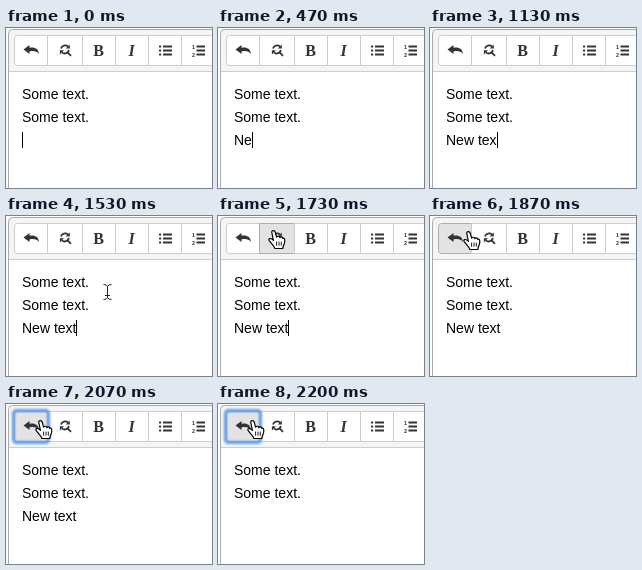
An HTML page that plays this animation: 206 by 160 pixels, repeating every 2.47 s.

```html
<!DOCTYPE html>
<html lang="en">
<head>
<meta charset="utf-8">
<title>Undo in a text editor</title>
<style>
html, body { margin: 0; width: 100%; height: 100%; overflow: hidden; background: #fff; }
svg { display: block; width: 100vw; height: 100vh; }
.line { font: 14px "Liberation Sans", Arial, sans-serif; fill: #000; white-space: pre; }
.glyph { font: bold 16px "Liberation Serif", Times, serif; fill: #333; text-anchor: middle; }
.num { font: bold 5.5px "Liberation Sans", Arial, sans-serif; fill: #333; }
.button { fill: #fff; stroke: #ccc; }
.hover { fill: #e3e3e3; stroke: #adadad; }
</style>
</head>
<body>
<svg viewBox="0 0 206 160" xmlns="http://www.w3.org/2000/svg">
  <defs>
    <filter id="soft" x="-30%" y="-30%" width="160%" height="160%"><feGaussianBlur stdDeviation="0.8"/></filter>
  </defs>
  <rect width="206" height="160" fill="#fff"/>
  <path d="M2.5 43.5V5.5Q2.5 1.5 6.5 1.5H206V43.5Z" fill="#f5f5f5"/>
  <path d="M3 43.5H206" stroke="#ccc"/>
  <path d="M2.5 160V5.5Q2.5 1.5 6.5 1.5H206" fill="none" stroke="#aaa"/>

  <g id="buttons"></g>
  <rect id="ring" x="7.5" y="6.5" width="35" height="32" rx="3" fill="none" stroke="#5a9bea" stroke-width="3" filter="url(#soft)"/>

  <path d="M17.5 21.5L23.5 17V19.7C29 18.8 32.5 20.8 33 26C30.6 23.1 28 22.6 23.5 23.4V26Z" fill="#333"/>
  <g fill="none" stroke="#333" stroke-width="1.8">
    <path d="M55 20.5A4.2 4.2 0 0 1 62 18.6M62.9 22A4.2 4.2 0 0 1 56 24.4M61.6 24.4L65 27.8"/>
    <path d="M63.8 16.4V20.6H59.8ZM53.9 26.5V22.3H58Z" fill="#333" stroke="none"/>
  </g>
  <text class="glyph" x="92.5" y="28">B</text>
  <text class="glyph" x="125.5" y="28" font-style="italic" style="font-style:italic">I</text>
  <g id="lists" fill="#333"></g>

  <text class="line" x="16" y="71">Some text.</text>
  <text class="line" x="16" y="94">Some text.</text>
  <text class="line" id="typed" x="16" y="117" xml:space="preserve"></text>
  <rect id="caret" y="104" width="1" height="16" fill="#000"/>

  <g id="beam" fill="none" stroke-linecap="square">
    <path d="M-3 -7.5Q0 -7.5 0.5 -5.5Q1 -7.5 4 -7.5M0.5 -5.5V5.5M-3 7.5Q0 7.5 0.5 5.5Q1 7.5 4 7.5M-1.5 3.5H2.5" stroke="#fff" stroke-width="2.6"/>
    <path d="M-3 -7.5Q0 -7.5 0.5 -5.5Q1 -7.5 4 -7.5M0.5 -5.5V5.5M-3 7.5Q0 7.5 0.5 5.5Q1 7.5 4 7.5M-1.5 3.5H2.5" stroke="#222"/>
  </g>
  <g id="hand" stroke="#000" stroke-linejoin="round" stroke-linecap="round">
    <path d="M-2.2 1.5C-2.6 -0.8 0.6 -1 1.2 1L2.6 6.2C3.2 4.8 5.6 5 5.9 6.6C6.7 5.4 8.6 5.8 8.8 7.4C10 6.8 11 7.8 10.8 10C10.7 13 9.2 14.2 8.8 17.5H1C0 14.4 -3.4 12 -5 9.2C-5.6 7.4 -3.4 6.9 -1.8 8.4L-0.6 9.4Z" fill="#fff" stroke-width="1.2"/>
    <path d="M2.6 11V14.3M5 11V14.3M7.3 11V14.3" stroke-width="0.9"/>
  </g>
</svg>
<script>
const LOOP = 2470;
const NS = "http://www.w3.org/2000/svg";
const get = id => document.getElementById(id);

function add(parent, tag, attrs, text = "") {
  const el = document.createElementNS(NS, tag);
  for (const key in attrs) el.setAttribute(key, attrs[key]);
  el.textContent = text;
  parent.appendChild(el);
  return el;
}

const edges = [8.5, 41.5, 76.5, 109.5, 142.5, 175.5, 209.5];
const buttons = edges.slice(0, -1).map((x, i) => {
  const right = edges[i + 1];
  const d = i === 0
    ? `M${right} 7.5H11.5Q${x} 7.5 ${x} 10.5V34.5Q${x} 37.5 11.5 37.5H${right}Z`
    : `M${x} 7.5H${right}V37.5H${x}Z`;
  return add(get("buttons"), "path", { d, class: "button" });
});

for (let row = 0; row < 3; row++) {
  const y = 17.5 + row * 4;
  add(get("lists"), "rect", { x: 153, y, width: 2.2, height: 2, rx: 0.6 });
  add(get("lists"), "rect", { x: 157, y, width: 9, height: 2 });
  add(get("lists"), "rect", { x: 190.5, y, width: 8.5, height: 2 });
  if (row !== 1) add(get("lists"), "text", { x: 186, y: y + 3, class: "num" }, row ? "2" : "1");
}

// [time, value] steps; the last one reached holds
const typing = [[0, ""], [270, "N"], [470, "Ne"], [530, "New"], [670, "New "], [870, "New t"],
  [930, "New te"], [1130, "New tex"], [1330, "New text"], [2200, ""]];
const pointer = [[0, null], [1530, [101, 76]], [1600, [88, 56]], [1670, [67, 28]], [1730, [56, 15]],
  [1800, [51, 15]], [1870, [39, 16]], [1930, [35, 17]]];
const PRESS = 2070, CARET_OFF = 1870;

const at = (steps, t) => steps.filter(s => s[0] <= t).pop()[1];
const show = (el, on) => el.setAttribute("visibility", on ? "visible" : "hidden");

function draw(t) {
  const text = at(typing, t);
  const typed = get("typed");
  typed.textContent = text;
  const end = text ? 16 + typed.getComputedTextLength() : 16;
  get("caret").setAttribute("x", Math.round(end));
  show(get("caret"), t < CARET_OFF);

  const pos = at(pointer, t);
  const inBar = pos && pos[1] < 43;
  show(get("beam"), pos && !inBar);
  show(get("hand"), inBar);
  if (pos) get(inBar ? "hand" : "beam").setAttribute("transform", `translate(${pos})`);

  buttons.forEach((button, i) => {
    const over = inBar && pos[0] > edges[i] && pos[0] < edges[i + 1];
    button.setAttribute("class", over ? "button hover" : "button");
  });
  show(get("ring"), t >= PRESS);
}

const start = performance.now();
function tick() {
  draw((performance.now() - start) % LOOP);
  requestAnimationFrame(tick);
}
tick();
</script>
</body>
</html>
```
